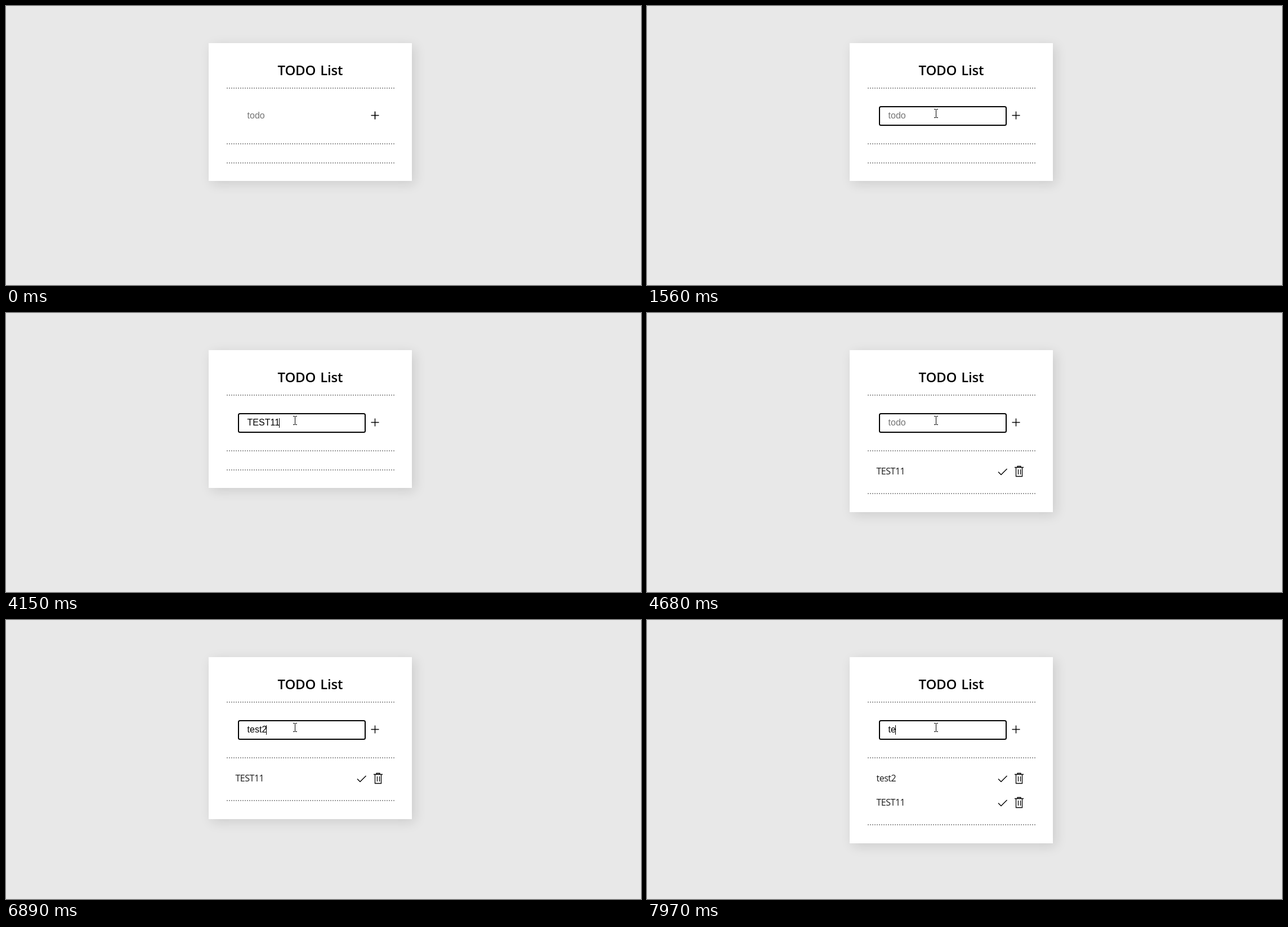
Animation, 1128 px wide and 496 px high, one loop 8000 ms. Source, as an HTML page with a canvas:

```html
<!DOCTYPE html>
<html lang="en">
<head>
<meta charset="utf-8">
<title>TODO List</title>
<style>
  html, body { margin: 0; height: 100%; overflow: hidden; background: #e8e8e8; }
  canvas { display: block; }
</style>
</head>
<body>
<canvas id="stage" width="1128" height="496"></canvas>
<script>
const ctx = document.getElementById('stage').getContext('2d');
const LOOP = 8000, FOCUS = 1010, ROW = 42.65;
const INPUT_FONT = '16px "Liberation Sans", Arial, sans-serif';
const HANGUL_FONT = '16px "Noto Sans CJK KR", "Noto Sans CJK", sans-serif';
const UI_FONT = '"Open Sans", "Noto Sans", sans-serif';

// [start time, typed text, caret visible]
const typing = [
  [0, '', 0], [1010, '', 1], [1560, '', 0],
  [1830, 'ㅅ', 1], [1960, 'ㅅㄷ', 1], [2090, 'ㅅㄷㄴ', 1], [2160, 'ㅅㄷㄴㅅ', 1],
  [2420, 'ㅅㄷㄴ', 1], [2950, 'ㅅ', 0], [3020, '', 0],
  [3220, 'T', 1], [3290, 'TE', 1], [3420, 'TES', 1], [3490, 'TEST', 1],
  [3950, 'TEST1', 1], [4150, 'TEST11', 1],
  [4680, '', 0], [5230, '', 1], [5760, '', 0],
  [6290, 'te', 1], [6490, 'tes', 1], [6620, 'test', 1], [6890, 'test2', 1],
  [7240, '', 1], [7440, '', 0], [7900, 't', 1], [7970, 'te', 1],
];
const added = [[4680, 'TEST11'], [7240, 'test2']];

function text(str, x, y, font, color = '#000', spacing = 0) {
  ctx.font = font;
  ctx.fillStyle = color;
  ctx.letterSpacing = spacing + 'px';
  ctx.fillText(str, x, y);
}

function stroke(path, width, color = '#000') {
  ctx.lineWidth = width;
  ctx.strokeStyle = color;
  ctx.stroke(new Path2D(path));
}

function dottedLine(y) {
  ctx.save();
  ctx.lineCap = 'round';
  ctx.setLineDash([0, 4]);
  stroke(`M393 ${y}H689.1`, 2, '#777');
  ctx.restore();
}

function card(bottom) {
  ctx.save();
  ctx.shadowColor = 'rgba(0,0,0,.12)';
  ctx.shadowBlur = 20;
  ctx.shadowOffsetX = ctx.shadowOffsetY = 5;
  ctx.fillStyle = '#fff';
  ctx.fillRect(360, 66, 361, bottom - 66);
  ctx.restore();
}

function item(label, row) {
  ctx.save();
  ctx.translate(0, Math.round(row * ROW));
  text(label, 407.5, 287, '16px ' + UI_FONT, '#1a1a1a', -0.5);
  stroke('M624 282.5L629 287.5L639.5 277', 1.4);
  stroke('M653 274.5H669M658 274V272.5H664V274M655.5 275V290.5H666.5V275M659.5 278V287M663.5 278V287', 1.3);
  ctx.restore();
}

function inputField(t) {
  const [, typed, caret] = typing.findLast(([start]) => t >= start);
  const hangul = typed >= 'ㄱ';
  const focused = t >= FOCUS;

  if (focused) {
    ctx.beginPath();
    ctx.roundRect(413, 179, 225, 33, 2.5);
    ctx.lineWidth = 2;
    ctx.strokeStyle = '#000';
    ctx.stroke();
  }
  if (hangul) text(typed, 429, 203, HANGUL_FONT, '#000', 1.28);
  else text(typed || 'todo', 428.6, 200, INPUT_FONT, typed ? '#000' : '#757575');

  if (caret) {
    const width = hangul ? 16 * typed.length : ctx.measureText(typed).width;
    ctx.fillStyle = '#000';
    ctx.fillRect(Math.max(429, Math.floor(428 + width)), hangul ? 188 : 187, 1, 17);
  }
  const y = hangul ? 196.5 : 194.5;
  stroke(`M648.5 ${y}h14M655.5 ${y - 7}v14`, focused ? 1.4 : 1.7);
}

function pointer(t) {
  if (t < 200) return;
  const u = Math.min(7, Math.floor((t - 200) / 81.4)) / 7;
  const bezier = (a, b, c) => Math.round(a * (1 - u) ** 2 + 2 * b * u * (1 - u) + c * u * u);
  const x = bezier(641, 540, 513), y = bezier(317, 88, 191);

  ctx.save();
  ctx.translate(x, y);
  if (x > 412 && x < 639 && y > 178 && y < 213) {
    stroke('M-3 -7.5H0M1 -7.5H4M.5 -7V7M-3 7.5H0M1 7.5H4', 1);
  } else {
    const arrow = 'M.5 .5V16.5L4.2 13L6.8 18.5L9 17.5L6.5 12H11.5Z';
    ctx.fillStyle = '#fff';
    ctx.fill(new Path2D(arrow));
    stroke(arrow, 1);
  }
  ctx.restore();
}

function draw() {
  const t = performance.now() % LOOP;
  const items = added.filter(([start]) => t >= start).reverse();
  const growth = items.length * ROW;

  ctx.fillStyle = '#e8e8e8';
  ctx.fillRect(0, 0, 1128, 496);
  card(Math.round(311.4 + growth));
  ctx.wordSpacing = '2px';
  text('TODO List', 482.5, 123, '600 24px ' + UI_FONT, '#000', -0.2);
  ctx.wordSpacing = '0px';
  [146, 245, Math.round(278.7 + growth)].forEach(dottedLine);
  inputField(t);
  items.forEach(([, label], row) => item(label, row));
  pointer(t);
  requestAnimationFrame(draw);
}
draw();
</script>
</body>
</html>
```
